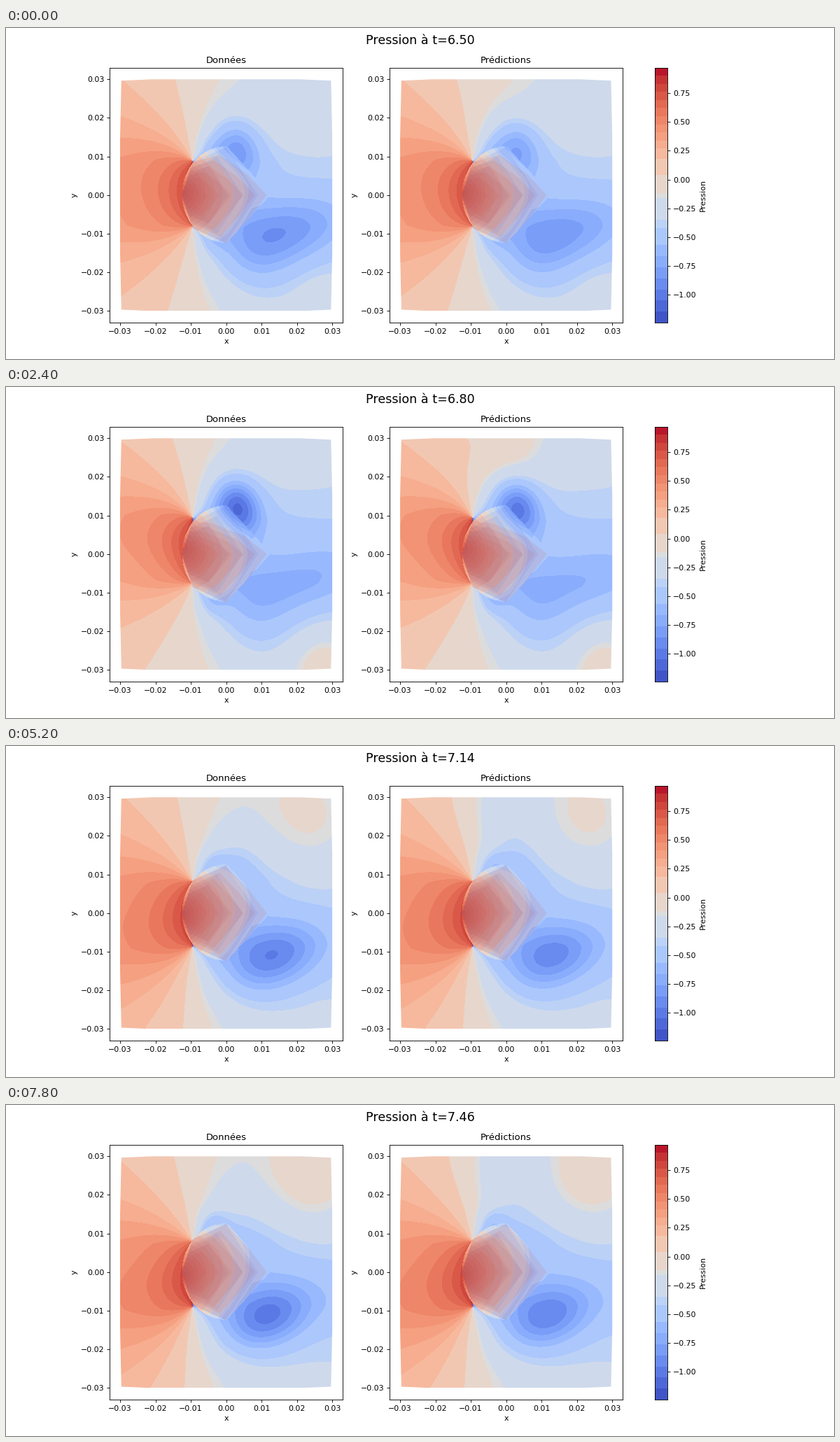
Recreate the animation shown at these times as a matplotlib script. Size 1183 by 473 pixels, loop 8 s.

```python
import numpy as np
import matplotlib.pyplot as plt
from matplotlib.animation import FuncAnimation
from matplotlib.colors import BoundaryNorm, ListedColormap
from matplotlib.patches import Polygon

W, H = 1183, 473
S = 0.7887  # text and line scale at 100 dpi
FRAMES, INTERVAL = 40, 200
PHASE_STEP = 16 / 19  # share of a shedding cycle per frame

plt.rcParams.update({
    "font.family": "DejaVu Sans", "font.size": 10 * S,
    "axes.linewidth": 0.8 * S, "axes.titlepad": 6 * S, "axes.labelpad": 4 * S,
    "xtick.major.size": 3.5 * S, "ytick.major.size": 3.5 * S,
    "xtick.major.width": 0.8 * S, "ytick.major.width": 0.8 * S,
    "xtick.major.pad": 3.5 * S, "ytick.major.pad": 3.5 * S,
})

# Pressure bands: even steps at both ends, broad ones in the middle
LOW, HIGH = -1.243, 0.972
LEVELS = np.r_[np.linspace(LOW, -0.57, 8), -0.42, -0.35, -0.16, -0.12, 0.04, 0.18,
               np.linspace(0.27, HIGH, 11)]
MIDS = (LEVELS[:-1] + LEVELS[1:]) / 2
CMAP = ListedColormap(plt.get_cmap("coolwarm")((MIDS - LOW) / (HIGH - LOW)))
NORM = BoundaryNorm(LEVELS, CMAP.N)

# Lengths in cm; the body is round in front and pointed behind
RADIUS = 1.25
SHOULDER_X, SHOULDER_Y = -0.95, 0.85  # where the flow leaves the front face
TIP = np.array([-RADIUS, 0])
gx, gy = np.meshgrid(np.linspace(-3, 3, 303), np.linspace(-3, 3, 332))
in_body = np.where(gx < 0, np.hypot(gx, gy), gx + abs(gy)) < RADIUS


def bump(x, y, cx, cy, wx, wy=None):
    return np.exp(-((x - cx) / wx) ** 2 - ((y - cy) / (wy or wx)) ** 2)


def wave(turns):
    return np.cos(2 * np.pi * turns)


def age(phase, side):
    """Age in cycles of the newest vortex on one side (1 above, -1 below)."""
    birth = 0.605 if side < 0 else 0.105
    return (phase - birth + 0.25) % 1 - 0.25


def mean_flow(phase):
    """Stagnation in front and low pressure behind, fanning out of the shoulders."""
    swing = wave(phase - 0.21)
    front = 1 / (1 + np.exp((gx - SHOULDER_X) / 0.25))
    y = gy - 0.2 * swing * front
    u = SHOULDER_X - gx
    facing = np.arctan2(2 * SHOULDER_Y * u, u ** 2 + y ** 2 - SHOULDER_Y ** 2)
    turn = np.clip(np.arctan2(abs(y) - SHOULDER_Y, u), 0, np.pi)
    turn[(u < 0) & (abs(y) < SHOULDER_Y)] = np.pi
    outside = 0.27 + 0.6 * facing / np.pi - 0.2 * turn
    inside = np.maximum(0.74 - 0.6 * np.hypot(gx + RADIUS, y), -0.45)
    surge = 0.01 + 0.04 * wave(2 * (phase - 0.87)) + 0.04 * swing * np.tanh(2 * gy)
    return np.where(in_body, inside, outside) + front * surge


def vortex_side(phase, side, gain):
    """Vortex grown and shed on one side, with the pressure it stirs up."""
    s = age(phase, side)
    t = max(s, 0)
    y = side * gy
    cx, cy = 0.3 + 3 * t + 2.5 * t ** 2, RADIUS - 5 * t ** 3
    strength = 0.65 * np.exp(-(s / (0.15 if s < 0 else 0.5)) ** 2)
    core = bump(gx, y + 0.2 * (gx - cx), cx, cy, 0.65 + 2.4 * t, 0.7 + 0.4 * t)
    rest = 0.2 * np.exp(-((s - 0.43) / 0.15) ** 2) * bump(gx, y, 0.8, 1.6, 1.1)
    seed = 0.1 * (1 - wave(s - 0.15)) * bump(gx, y, -0.4, 1.2, 0.4)
    rise = 0.36 * np.exp(-((s - 0.13) / 0.25) ** 2)
    ridge = bump(gx, y, 2.8 - 1.5 * t, 2.5 * t - 2.9, 1 + 2.5 * s)
    return rise * ridge - gain * strength * core - rest - seed


def pressure(phase, gain=1):
    return mean_flow(phase) + sum(vortex_side(phase, side, gain) for side in (1, -1))


def predicted(phase):
    drift = 0.16 * wave(2 * (phase - 0.86)) * bump(gx, gy, 0, 2.8, 1.1)
    return pressure(phase, 0.9) - drift


def half_body(phase, side):
    """Shoulder, top corner and edge point; the corner dips as a vortex grows."""
    dip = np.exp(-(age(phase, side) / 0.12) ** 2)
    points = np.array([(SHOULDER_X, SHOULDER_Y),
                       (-0.4 * dip, RADIUS - 0.45 * dip),
                       (0.65 - 0.1 * dip, 0.6 - 0.15 * dip)])
    return points * (1, side)


def body_outline(phase):
    return np.vstack([TIP, half_body(phase, 1), (1.15, 0), half_body(phase, -1)[::-1]])


def shrink(points, s):
    return (TIP + s * (points - TIP)) / 100


def domain_outline():
    """Square with slightly bulging sides."""
    corner, shoulder = 2.965, 2.1
    quarter = np.array([(3, 1.5), (corner, corner), (shoulder, 3)])
    turns = [(1, 1), (-1, 1), (-1, -1), (1, -1)]
    return np.vstack([quarter[::i * j] * (i, j) for i, j in turns]) / 100


# Same layout as two subplots sharing one colorbar
LEFT, BOTTOM, HEIGHT = 0.125, 0.11, 0.77
PANEL = 0.62 / 2.2
RED, BLUE = (0.84, 0.34, 0.28), (0.30, 0.39, 0.84)
SCALES = np.linspace(1, 0.3, 6)


def make_panel(left, title):
    ax = fig.add_axes([left, BOTTOM, PANEL, HEIGHT])
    image = ax.imshow(np.zeros(gx.shape), cmap=CMAP, norm=NORM, origin="lower",
                      extent=(-0.03, 0.03, -0.03, 0.03), aspect="auto",
                      interpolation="nearest")
    image.set_clip_path(Polygon(domain_outline(), transform=ax.transData))
    hull = np.vstack([TIP, half_body(0.35, 1)[:2], (0.9, 0), half_body(0.85, -1)[1::-1]])
    for s in (1, 0.8, 0.6):
        ax.add_patch(Polygon(shrink(hull, s), fc=BLUE, alpha=0.1, lw=0))
    layers = [ax.add_patch(Polygon(shrink(hull, s), fc=RED, alpha=0.12, lw=0))
              for s in SCALES]
    ticks = np.arange(-3, 4) / 100
    ax.set(xlim=(-0.033, 0.033), ylim=(-0.033, 0.033), xticks=ticks, yticks=ticks,
           xlabel="x", ylabel="y", title=title)
    return image, layers


def make_colorbar():
    ax = fig.add_axes([0.78375, BOTTOM, HEIGHT * H / W / 20, HEIGHT])
    ax.pcolormesh([0, 1], LEVELS, MIDS[:, None], cmap=CMAP, norm=NORM)
    ax.set(xlim=(0, 1), ylim=(LOW, HIGH), xticks=[], yticks=np.arange(-4, 4) / 4)
    ax.yaxis.tick_right()
    ax.yaxis.set_label_position("right")
    ax.set_ylabel("Pression")


fig = plt.figure(figsize=(W / 100, H / 100), dpi=100, facecolor="white")
heading = fig.suptitle("", fontsize=16 * S)
panels = [make_panel(LEFT, "Données"), make_panel(LEFT + 1.2 * PANEL, "Prédictions")]
make_colorbar()


def update(i):
    heading.set_text(f"Pression à t={6.5 + 0.0246 * i:.2f}")
    phase = PHASE_STEP * i % 1
    body = body_outline(phase)
    for (image, layers), field in zip(panels, (pressure(phase), predicted(phase))):
        image.set_data(np.clip(field, LOW + 1e-3, HIGH - 1e-3))
        for s, layer in zip(SCALES, layers):
            layer.set_xy(shrink(body, s))
    return []


anim = FuncAnimation(fig, update, frames=FRAMES, interval=INTERVAL,
                     repeat=True, repeat_delay=0, blit=False)
plt.show()
```
